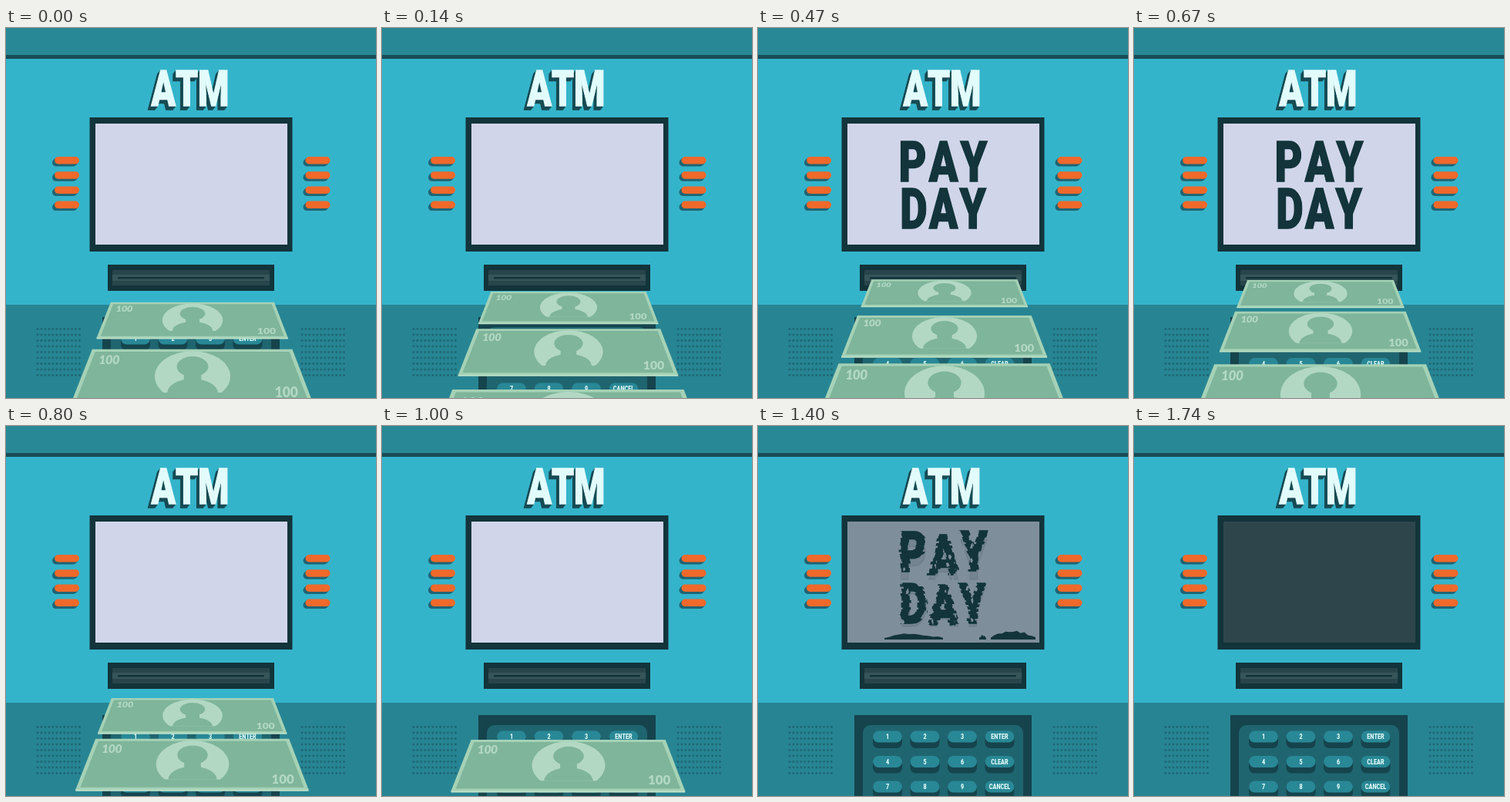
An HTML page with a canvas that plays this animation: 480x480 px, repeating every 2.41 s.

```html
<!DOCTYPE html>
<html lang="en">
<head>
<meta charset="utf-8">
<title>ATM pay day</title>
<style>
html, body { margin: 0; width: 100%; height: 100%; overflow: hidden; background: #34b4cb; }
canvas { display: block; width: 100vw; height: 100vh; }
</style>
</head>
<body>
<canvas id="stage" width="480" height="480"></canvas>
<script>
const ctx = document.getElementById('stage').getContext('2d');
const LOOP = 2410, FPS = 15, LAST = 26;
const INK = '#12343a', DEEP = '#15444d', TEAL = '#298896', PALE = '#e2fcfb';
const BRIGHT = [208, 213, 234], DARK = [46, 70, 75];
const HORIZON = 237.5, SLOT_DEPTH = 88.5, GROWTH = 1.1362;
const RELEASES = [-5.53, -2.27, 0.7, 3.66, 6.97, 9.91];

const clamp = v => Math.max(0, Math.min(1, v));
const rand = n => { const v = Math.sin(n * 127.1) * 43758.5453; return v - Math.floor(v); };

function rect(x, y, w, h, color, r = 0) {
  ctx.fillStyle = color;
  ctx.beginPath();
  ctx.roundRect(x, y, w, h, r);
  ctx.fill();
}

function poly(points, color) {
  ctx.fillStyle = color;
  ctx.beginPath();
  points.forEach(([x, y]) => ctx.lineTo(x, y));
  ctx.fill();
}

function oval(x, y, rx, ry, color) {
  ctx.fillStyle = color;
  ctx.beginPath();
  ctx.ellipse(x, y, rx, ry, 0, 0, Math.PI * 2);
  ctx.fill();
}

// Condensed heavy lettering, centred on x with its baseline at y
function label(text, x, y, size, color, narrow, weight = 0, spacing = 0) {
  ctx.save();
  ctx.translate(x, y);
  ctx.scale(narrow, 1);
  ctx.font = `900 ${size}px Roboto, "Liberation Sans", sans-serif`;
  ctx.fontKerning = 'none';
  ctx.letterSpacing = `${spacing}px`;
  ctx.textAlign = 'center';
  ctx.fillStyle = ctx.strokeStyle = color;
  ctx.fillText(text, spacing / 2, 0);
  if (weight) {
    ctx.lineWidth = weight;
    ctx.strokeText(text, spacing / 2, 0);
  }
  ctx.restore();
}

function drawButtons(x) {
  for (let k = 0; k < 4; k++) {
    const y = 167 + k * 19.2;
    for (let s = 3; s > 0; s--) rect(x - s, y + s, 32, 9.5, '#1f6575', 4.7);
    rect(x, y, 32, 9.5, '#f0692a', 4.7);
  }
}

function drawSpeaker(x) {
  for (let r = 0; r < 9; r++)
    for (let c = 0; c < 12; c++)
      oval(x + c * 4.95, 390.5 + r * 7.5, 1.4, 1.4, '#1f6673');
}

function drawKeypad() {
  rect(125, 375, 230, 110, DEEP);
  rect(136, 388, 208, 110, '#1f6570', 10);
  const rows = [['1', '2', '3', 'ENTER'], ['4', '5', '6', 'CLEAR'], ['7', '8', '9', 'CANCEL']];
  rows.forEach((row, r) => row.forEach((key, c) => {
    const x = 168 + c * 48.5, y = 403 + r * 32.5;
    rect(x - 19, y - 7, 38, 22, DEEP, 7);
    rect(x - 19, y - 7.5, 38, 15, TEAL, 7.5);
    label(key, x, y + 3.2, 9, PALE, 0.8);
  }));
}

function drawMachine() {
  rect(0, 0, 480, 480, '#34b4cb');
  rect(0, 0, 480, 36, TEAL);
  rect(0, 35, 480, 5, '#194c55');
  rect(0, 359, 480, 121, '#278593');
  for (let s = 5; s > 0; s--) label('ATM', 239 - s * 0.8, 101 + s, 65, '#174b54', 0.71, 1.5);
  label('ATM', 239, 101, 65, PALE, 0.71, 1.5);
  drawButtons(63);
  drawButtons(388.5);
  drawSpeaker(41);
  drawSpeaker(384);
  drawKeypad();
  rect(132, 307, 216, 34, INK);
  rect(138, 314, 204, 20, '#28454b');
  rect(138, 320, 204, 8, '#36555b');
  rect(145, 323, 190, 2.5, INK);
}

function drawWords() {
  label('PAY', 240, 199, 73, INK, 0.76, 1.5, 4);
  label('DAY', 240, 260, 72, INK, 0.76, 1.5, 3);
}

// Words torn into shifted strips, bitten away, then dropping
function drawCrumble(i, screen) {
  const amount = clamp((i - 18) / 3), fall = Math.max(0, i - 21) ** 2 * 5;
  ctx.globalAlpha = 0.1 * amount;
  drawWords();
  ctx.globalAlpha = clamp((25 - i) / 3);
  [[170, 47, -10], [217, 39, -6], [256, 50, -11]].forEach(([x, w, lift], c) => {
    for (let k = 0; k < 42; k++) {
      const n = c * 50 + k, y = 140 + k * 3;
      const drop = k > 20 ? lift * 0.4 : lift;
      ctx.save();
      ctx.translate((rand(n) - 0.5) * 5 * amount, drop * amount + fall * (0.6 + rand(c + 7)));
      ctx.beginPath();
      ctx.rect(x, y, w, 3.5);
      ctx.clip();
      drawWords();
      ctx.restore();
    }
  });
  for (let k = 0; k < 50; k++) {
    const x = 178 + rand(k + 200) * 120, y = 132 + rand(k + 300) * 132 + fall;
    const size = (1 + rand(k + 400) * 3) * amount;
    poly([0, 1, 2, 3, 4].map(j => {
      const a = j * 1.257, d = size * (0.4 + rand(k * 5 + j));
      return [x + Math.cos(a) * d * 0.7, y + Math.sin(a) * d * 1.3];
    }), screen);
  }
  [[164, 76, 8], [287, 9, 6], [302, 58, 12]].forEach(([x, w, h], p) => {
    const pile = [[x, 277]];
    for (let k = 0; k <= 12; k++) {
      const hump = Math.sin(Math.PI * (k + 1) / 14) * (0.5 + rand(k + p * 20) * 0.5);
      pile.push([x + w * k / 12, 276 - h * hump * amount]);
    }
    pile.push([x + w, 277]);
    poly(pile, INK);
  });
}

function drawScreen(i) {
  const dim = clamp((i - 16) / 10);
  const screen = `rgb(${BRIGHT.map((v, k) => Math.round(v + (DARK[k] - v) * dim))})`;
  rect(108.5, 116, 263, 174, INK);
  rect(116, 124, 249, 157, screen);
  ctx.save();
  ctx.beginPath();
  ctx.rect(116, 124, 249, 157);
  ctx.clip();
  if (i >= 6 && i < 12) drawWords();
  if (i >= 18 && i < 25) drawCrumble(i, screen);
  ctx.restore();
}

function drawBill(depth) {
  const top = HORIZON + depth, bottom = HORIZON + depth * 1.392;
  const left = y => 147.5 - (y - 326) * 0.393, right = y => 336.5 + (y - 326) * 0.385;
  const zoom = depth / 169.5, mid = (top + bottom) / 2;
  const wide = (right(mid) - left(mid)) / 281;
  const sheet = (inset, color) => {
    const a = top + inset * 0.6, b = bottom - inset * 0.6;
    poly([[left(a) + inset, a], [right(a) - inset, a], [right(b) - inset, b], [left(b) + inset, b]], color);
  };
  const light = '#b2d8c4', green = '#7fb59a';
  const edge = 2 * zoom;
  poly([[left(bottom), bottom - 1], [right(bottom), bottom - 1],
    [right(bottom), bottom + edge], [left(bottom), bottom + edge]], '#bfe2cb');
  sheet(0, '#a5d2b6');
  sheet(5 * wide, green);

  ctx.save();
  ctx.transform(wide, 0, 0, zoom, 242, mid);
  ctx.beginPath();
  ctx.rect(-60, -34, 120, 54);
  ctx.clip();
  oval(0, 0, 48, 31, light);
  oval(0, -12, 20, 12.5, green);
  rect(-11, -6, 22, 16, green);
  oval(0, 20, 32, 17, green);
  ctx.restore();

  const figure = (x, y, size, lean) => {
    ctx.save();
    ctx.transform(wide, 0, lean, zoom, x, y);
    ctx.font = `900 ${size}px Lato, sans-serif`;
    ctx.textAlign = 'center';
    ctx.fillStyle = light;
    ctx.fillText('100', 0, 0);
    ctx.restore();
  };
  figure(left(top) + 21 * wide, top + 18 * zoom, 15, -0.12);
  figure(right(bottom) - 34 * wide, bottom - 8 * zoom, 17, 0);
}

function draw(now) {
  const i = Math.min(LAST, Math.floor((now % LOOP + 0.5) * FPS / 1000));
  drawMachine();
  drawScreen(i);
  for (const start of RELEASES)
    if (i >= start) drawBill(SLOT_DEPTH * GROWTH ** (i - start));
}

let begin;
function tick(now) {
  begin ??= now;
  draw(now - begin);
  requestAnimationFrame(tick);
}
draw(0);
requestAnimationFrame(tick);
</script>
</body>
</html>
```
